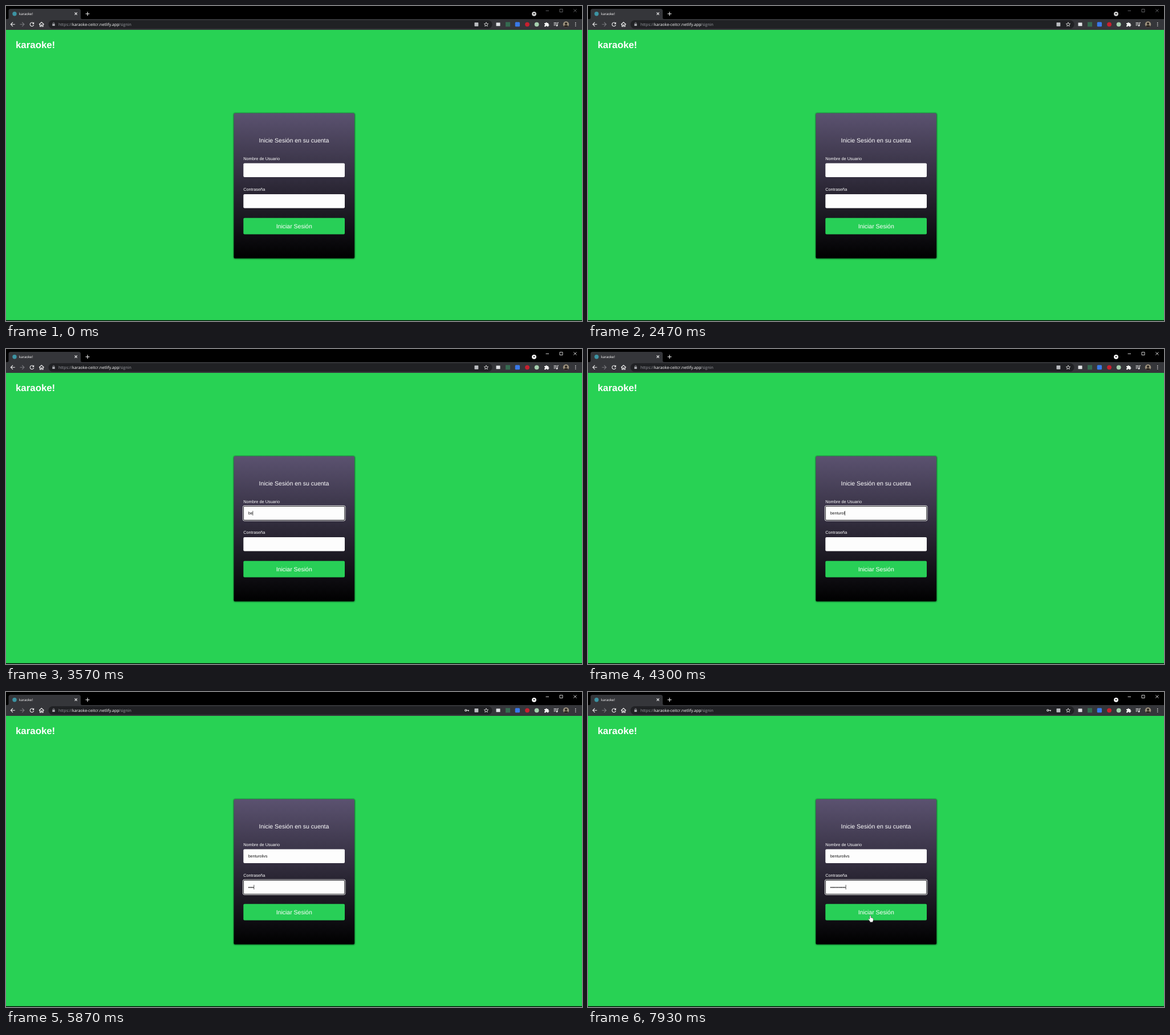
An HTML page that plays this animation: 1010 by 554 pixels, repeating every 8000 ms.

```html
<!DOCTYPE html>
<html lang="es">
<head>
<meta charset="utf-8">
<title>karaoke!</title>
<style>
html, body { margin: 0; width: 100%; height: 100%; overflow: hidden; background: #000; }
svg { display: block; width: 1010px; height: 554px; text-rendering: geometricPrecision; }
text { font-family: "Liberation Sans", Arial, sans-serif; fill: #fff; white-space: pre; }
.ui { font-family: "Open Sans", "Noto Sans", sans-serif; font-size: 7.07px; }
.dim { fill: #9a9ca1; }
.big { font-size: 10.53px; text-anchor: middle; }
.label { font-size: 7.37px; }
.typed { font-size: 7.02px; fill: #111; }
.line { fill: none; stroke: #f1f1f1; stroke-width: 1.1; }
.ring { fill: none; }
</style>
</head>
<body>
<svg viewBox="0 0 1010 554" xmlns="http://www.w3.org/2000/svg">
  <defs>
    <linearGradient id="fade" x1="0" y1="0" x2="0" y2="1">
      <stop offset="0" stop-color="#5b5270"/>
      <stop offset="1" stop-color="#000"/>
    </linearGradient>
    <filter id="soft" x="-10%" y="-10%" width="120%" height="120%">
      <feGaussianBlur stdDeviation="1.2"/>
    </filter>
    <clipPath id="face"><circle cx="982" cy="32.3" r="5.2"/></clipPath>
  </defs>

  <!-- window frame -->
  <rect width="1010" height="554" fill="#000"/>
  <path d="M2 23Q4.500 23 4.500 20.500V8.500Q4.500 5 8 5H127.500Q131 5 131 8.500V20.500Q131 23 133.500 23Z" fill="#35363a"/>
  <rect y="23" width="1010" height="19" fill="#35363a"/>
  <circle cx="15" cy="13.800" r="3.700" fill="#3d93a3"/>
  <text class="ui" x="23" y="16" style="font-size:6.1px">karaoke!</text>
  <path class="line" d="M120.500 11.500l4.200 4.200m0-4.200l-4.200 4.200M139.500 13.800h7m-3.500-3.500v7"/>
  <circle id="search" cx="926" cy="13.800" r="3.900"/>
  <path d="M924 12.800h4l-2 2.300z" fill="#000"/>
  <path id="controls" fill="none" stroke-width=".8" d="M946.500 8.400h5.500M971 5.600h5v5h-5zM995.300 5.500l5.200 5.200m0-5.200l-5.200 5.200"/>

  <!-- toolbar -->
  <rect x="74.500" y="25" width="778" height="14.800" rx="7.400" fill="#202124"/>
  <path class="line" d="M15.800 32.300H8.500m3.500-3.600l-3.600 3.600l3.600 3.600"/>
  <path class="line" style="stroke:#7b7c80" d="M24.500 32.300h7.300m-3.500-3.600l3.600 3.600l-3.600 3.600"/>
  <path class="line" d="M48 30.200A3.300 3.300 0 1 0 48.700 33.200"/>
  <path d="M49.200 28.200v3.500h-3.500z" fill="#f1f1f1"/>
  <path class="line" d="M58 32.500l4.300-4l4.300 4M59.500 31.800v4.200h1.900v-2.600h1.800v2.600h1.900v-4.200"/>
  <rect x="81.300" y="31.300" width="4.400" height="3.700" rx=".5" fill="#a9abb0"/>
  <path class="line" style="stroke:#a9abb0;stroke-width:.7" d="M82.200 31.300v-.9a1.300 1.300 0 0 1 2.600 0v.9"/>
  <text class="ui dim" x="92" y="34.900">https://</text>
  <text class="ui" x="116" y="34.900">karaoke-ceitcr.netlify.app</text>
  <text class="ui dim" x="197.800" y="34.900">/signin</text>
  <g id="key">
    <circle class="line" cx="806.200" cy="32.300" r="1.500"/>
    <path class="line" d="M807.700 32.300h4.300m-1.200 0v1.700"/>
  </g>
  <rect x="821.500" y="29" width="6.800" height="6.800" rx=".7" fill="#b9bbbf"/>
  <path id="star" class="line" style="stroke-width:.8"/>
  <rect x="859.500" y="29.300" width="7" height="6" rx=".5" fill="#dfe1e4"/>
  <rect x="876" y="28.300" width="8" height="8" fill="#356b50"/>
  <rect x="892.700" y="28.300" width="8.300" height="8" rx="1.500" fill="#3978e8"/>
  <circle cx="914" cy="32.300" r="3.900" fill="#c8202f"/>
  <circle cx="930.600" cy="32.300" r="3.900" fill="#a5cfae"/>
  <path fill="#f1f1f1" d="M944 30h2.300a1.300 1.300 0 1 1 2.600 0h2.200v2.200a1.300 1.300 0 1 1 0 2.600v1.500h-2.100a1.200 1.200 0 0 0-2.400 0H944v-2.100a1.200 1.200 0 0 0 0-2.400z"/>
  <path class="line" style="stroke-width:.9" d="M960.500 29.500h5.200m-5.200 2.200h5.200m-5.200 2.200h3.400M967 34.300v-5h2"/>
  <circle cx="966" cy="34.400" r="1.300" fill="#f1f1f1"/>
  <g clip-path="url(#face)">
    <rect x="976" y="26" width="12" height="13" fill="#9b907c"/>
    <circle cx="982" cy="31" r="2.100" fill="#2a2520"/>
    <ellipse cx="982" cy="37" rx="4" ry="3.600" fill="#2a2520"/>
  </g>
  <g fill="#f1f1f1">
    <circle cx="998.700" cy="29.600" r=".8"/><circle cx="998.700" cy="32.300" r=".8"/><circle cx="998.700" cy="35" r=".8"/>
  </g>

  <!-- page -->
  <rect y="42" width="1010" height="510.700" fill="#28d254"/>
  <text x="17" y="74.300" style="font-size:16.84px;font-weight:bold">karaoke!</text>
  <rect x="399" y="188.300" width="212.800" height="256.400" rx="3" fill="#063d18" opacity=".75" filter="url(#soft)"/>
  <rect x="399.500" y="188.600" width="211.500" height="255.200" rx="2.600" fill="url(#fade)"/>
  <text class="big" x="505" y="240">Inicie Sesión en su cuenta</text>
  <text class="label" x="416.200" y="270.700">Nombre de Usuario</text>
  <text class="label" x="416.200" y="325.100">Contraseña</text>
  <rect x="416.300" y="276.600" width="177.700" height="24.500" rx="2" fill="#fdfdfd"/>
  <rect x="416.300" y="331" width="177.700" height="24.500" rx="2" fill="#fdfdfd"/>
  <g id="ring" class="ring">
    <rect x="415.400" y="275.600" width="179.500" height="26.500" rx="2.600" stroke="#fff"/>
    <rect x="416.400" y="276.600" width="177.500" height="24.500" rx="1.800" stroke="#15151a"/>
  </g>
  <text id="user" class="typed" x="424.700" y="291.300"></text>
  <text id="pass" class="typed" x="424.700" y="345.700"></text>
  <rect id="caret" width=".7" height="8" fill="#111"/>
  <rect x="416.300" y="372.700" width="177.700" height="28.800" rx="2" fill="#28cf57"/>
  <text class="big" x="505.200" y="390.500">Iniciar Sesión</text>

  <!-- pointer shapes, hot spot at 0,0 -->
  <g id="pointer">
    <path id="beam" fill="none" stroke="#111" stroke-width=".7" d="M-1.500-4H1.500M0-4V4M-1.500 4H1.500"/>
    <path id="arrow" fill="#fff" stroke="#111" stroke-width=".5" d="M0 0v9l2.100-1.900l1.400 3.100l1.500-.7l-1.400-3H6.300z"/>
    <path id="hand" fill="#fff" stroke="#222" stroke-width=".4" d="M-1 1a1 1 0 0 1 2 0v3.100q.9-.6 1.500.2q.9-.4 1.400.5q1.300-.2 1.300 1.200v2.200q0 1.300-.9 2.300v1.200H-.6v-1.100L-3.100 7.200q-.8-1.300.2-1.600q.8-.2 1.900 1.200z"/>
  </g>
</svg>
<script>
const LOOP = 8000, BLINK = 530;
const FOCUS = 3100, TAB = 5100, KEY_ICON = 5570;
const MOVE = 7330, MOVE_END = 7930, MOVES = 9;
const NAME = "benturolivs";
const nameKeys = [3430, 3570, 3730, 3800, 3870, 4030, 4100, 4300, 4400, 4570, 4770];
const passKeys = [5500, 5630, 5770, 5870, 5930, 6100, 6200, 6370, 6470, 6600, 6800];

const el = id => document.getElementById(id);
const [user, pass, caret, ring, pointer] = ["user", "pass", "caret", "ring", "pointer"].map(el);
const show = (node, on) => node.setAttribute("visibility", on ? "visible" : "hidden");
const pressed = (keys, t) => keys.filter(k => k <= t).length;

const star = [...Array(10)].map((_, i) => {
  const a = i * Math.PI / 5 - Math.PI / 2, r = i % 2 ? 1.7 : 3.8;
  return (842 + r * Math.cos(a)).toFixed(2) + " " + (32.5 + r * Math.sin(a)).toFixed(2);
});
el("star").setAttribute("d", "M" + star.join("L") + "Z");

function drawCaret(t) {
  const inPass = t >= TAB;
  const field = inPass ? pass : user;
  const last = Math.max(FOCUS, ...[TAB, ...nameKeys, ...passKeys].filter(k => k <= t));
  const width = field.textContent ? field.getComputedTextLength() : 0;
  caret.setAttribute("x", 424.7 + width);
  caret.setAttribute("y", inPass ? 339.2 : 284.8);
  show(caret, t >= FOCUS && Math.floor((t - last) / BLINK) % 2 === 0);
}

function drawPointer(t) {
  const on = t >= MOVE;
  const step = Math.floor((t - MOVE) / (MOVE_END - MOVE) * MOVES + 0.001);
  const p = Math.max(0, Math.min(1, step / MOVES));
  const ease = p * p * (3 - 2 * p);
  const x = 487 + 8 * ease, y = 290 + 103 * ease;
  const overField = y < 301 || (y > 331 && y < 355.5);
  const overButton = y > 372.7;
  pointer.setAttribute("transform", `translate(${x} ${y})`);
  show(el("beam"), on && overField);
  show(el("hand"), on && overButton);
  show(el("arrow"), on && !overField && !overButton);
}

function draw(t) {
  const active = t >= FOCUS;
  el("controls").setAttribute("stroke", active ? "#fff" : "#77787b");
  el("search").setAttribute("fill", active ? "#fff" : "#d2d2d2");
  show(el("key"), t >= KEY_ICON);
  user.textContent = NAME.slice(0, pressed(nameKeys, t));
  pass.textContent = "•".repeat(pressed(passKeys, t));
  show(ring, active);
  ring.setAttribute("transform", `translate(0 ${t >= TAB ? 54.4 : 0})`);
  drawCaret(t);
  drawPointer(t);
}

const start = performance.now();
function tick(now) {
  draw(Math.max(0, now - start) % LOOP);
  requestAnimationFrame(tick);
}
draw(0);
requestAnimationFrame(tick);
</script>
</body>
</html>
```
